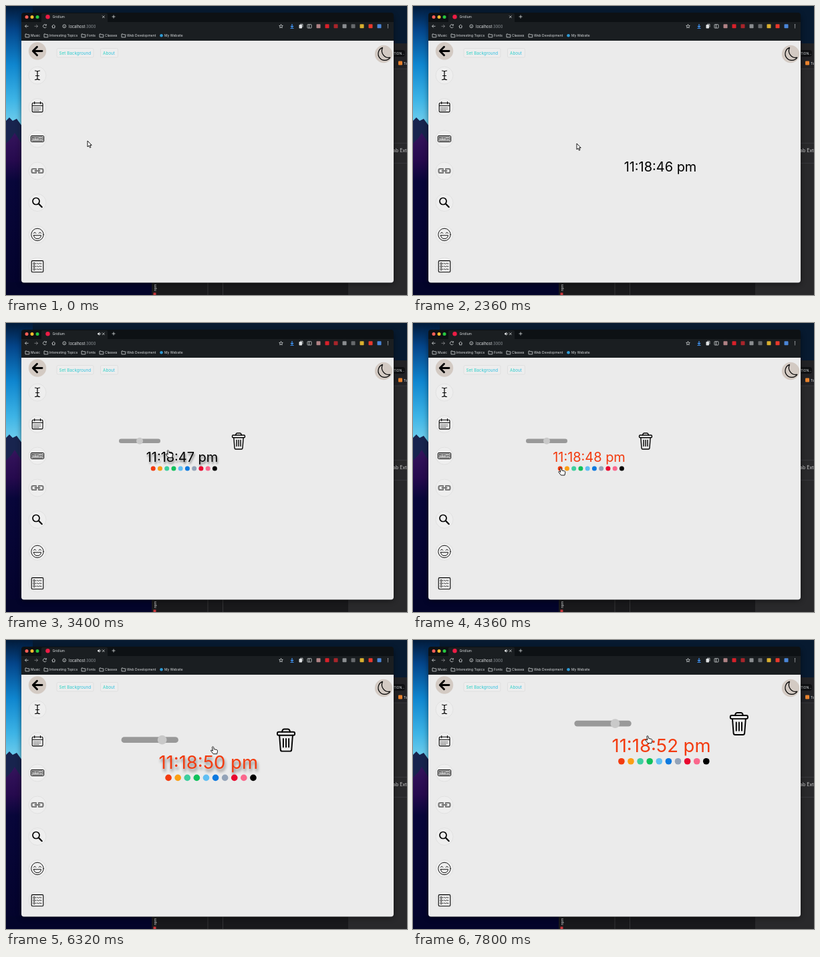
Recreate the animation shown at these times as an HTML page. Size 600 by 433 pixels, loop 7840 ms.

```html
<!DOCTYPE html>
<html lang="en">
<head>
<meta charset="utf-8">
<title>Desktop clock widget</title>
<style>
html, body { margin: 0; width: 100%; height: 100%; overflow: hidden; background: #07102b; }
svg { display: block; width: 100vw; height: 100vh; font-family: Inter, Roboto, sans-serif; }
.line { fill: none; stroke: #000; stroke-linecap: round; stroke-linejoin: round; }
.ui { fill: none; stroke: #d5d8da; stroke-width: .8; }
.label { fill: #dfe2e4; font-size: 5px; }
.pointer { fill: #fff; stroke: #000; stroke-width: .9; stroke-linejoin: round; }
</style>
</head>
<body>
<svg viewBox="0 0 600 433">
  <defs>
    <linearGradient id="sky" gradientUnits="userSpaceOnUse" x1="0" y1="0" x2="0" y2="175">
      <stop offset="0" stop-color="#021b3a"/><stop offset=".2" stop-color="#04458a"/>
      <stop offset=".5" stop-color="#0f86cf"/><stop offset=".8" stop-color="#3db4e6"/>
      <stop offset="1" stop-color="#6fcdec"/>
    </linearGradient>
    <linearGradient id="ridge" gradientUnits="userSpaceOnUse" x1="0" y1="190" x2="0" y2="433">
      <stop offset="0" stop-color="#35145c"/><stop offset=".17" stop-color="#260a4e"/>
      <stop offset=".3" stop-color="#08063a"/><stop offset="1" stop-color="#03032b"/>
    </linearGradient>
    <linearGradient id="aqua"><stop stop-color="#2bd5be"/><stop offset="1" stop-color="#34bde6"/></linearGradient>
    <filter id="soft" x="-10%" y="-10%" width="120%" height="120%"><feGaussianBlur stdDeviation="4"/></filter>
  </defs>

  <!-- Desktop and windows behind -->
  <rect width="600" height="433" fill="#071a30"/>
  <rect width="40" height="433" fill="url(#sky)"/>
  <path d="M0 172 5 167 10 172 16 169 24 180V433H0z" fill="#18244e"/>
  <path d="M0 206 8 198 13 190 24 207V433H0z" fill="url(#ridge)"/>
  <rect y="414" width="220" height="19" fill="#03042a"/>
  <g>
    <rect x="218" y="400" width="382" height="33" fill="#19191b"/>
    <path d="M302 414v19M324.500 414v19" stroke="#353537"/>
    <rect x="512" y="56" width="88" height="377" fill="#29292b"/>
    <rect x="570" y="56" width="30" height="38" fill="#222225"/>
    <rect x="570" y="66" width="27" height="10" rx="4" fill="#0f1012"/>
    <path d="M575 94h25M575 205.500h25M575 235.500h25" stroke="#3c3c3f" stroke-width=".8"/>
    <text x="580" y="73" class="label">TION...</text>
    <rect x="587" y="82.500" width="6" height="6" rx="1" fill="#e8822e"/>
    <text x="595" y="87.500" class="label">To</text>
    <text x="579" y="218.500" fill="#d2d2d2" font-size="7">ab Exte</text>
    <text transform="translate(225 427) rotate(-90)" class="label">npm</text>
    <rect x="220.500" y="429.500" width="4" height="3.500" fill="#c8373c"/>
  </g>
  <rect x="23" y="14" width="557" height="402" rx="5" opacity=".5" filter="url(#soft)"/>

  <!-- Browser -->
  <rect x="23" y="10" width="557" height="404.500" rx="4" fill="#0d1114"/>
  <path d="M53 24V13q0-2 2-2H150q2 0 2 2V24H580V52H23V24z" fill="#1a1e21"/>
  <circle cx="31" cy="16.500" r="2.500" fill="#ff5f57"/>
  <circle cx="39" cy="16.500" r="2.500" fill="#febc2e"/>
  <circle cx="47" cy="16.500" r="2.500" fill="#28c840"/>
  <circle cx="62.500" cy="16.300" r="3.200" fill="#ed1c45"/>
  <text x="69.500" y="18.300" class="label">Gridlum</text>
  <g id="sound"><path d="M137 15.200h1.300l1.700-1.500v5l-1.700-1.500H137z" fill="#dfe2e4"/><path class="ui" d="M141 14.700q1.200 1.500 0 3"/></g>
  <path class="ui" d="m144 14.500 3.500 3.500m0-3.500-3.500 3.500M158.500 16h5m-2.500-2.500v5
    M33.500 30.300h-5m2.300-2.300-2.300 2.300 2.300 2.300
    M60 28.700a2.500 2.500 0 1 0 .3 2.500M60.400 27.300v1.800h-1.800M68.500 30.500l2.700-2.500 2.700 2.500M69.500 30v2.800h3.400V30"/>
  <path class="ui" opacity=".6" d="M42.500 30.300h5m-2.300-2.300 2.300 2.300-2.300 2.300"/>
  <circle class="ui" cx="87.300" cy="30.300" r="2.400"/><path class="ui" d="M87.300 29.800v1.700"/>
  <text x="94" y="32.600" font-size="5.700" fill="#e4e6e8">localhost<tspan fill="#8d9398">:3000</tspan></text>
  <path class="ui" d="m411.500 27.500.8 1.800 2 .2-1.500 1.400.4 2-1.700-1-1.700 1 .4-2-1.500-1.400 2-.2z"/>
  <path d="M428 27v5m-2-2 2 2 2-2M425.500 33.500h5" fill="none" stroke="#3f91ef" stroke-width="1.200"/>
  <rect x="438.500" y="28" width="4.500" height="5.500" rx=".7" fill="#dfe2e4"/><path class="ui" d="M440 27.200h4v4.500"/>
  <rect class="ui" x="451" y="27.700" width="6" height="5.300" rx=".6"/><path class="ui" d="M453.500 28v5"/>
  <g id="extensions"></g>
  <g fill="#d5d8da"><circle cx="571.500" cy="28" r=".7"/><circle cx="571.500" cy="30.300" r=".7"/><circle cx="571.500" cy="32.600" r=".7"/></g>
  <g id="bookmarks"></g>
  <circle cx="232.500" cy="44.300" r="2.300" fill="#2d9bd6"/>
  <text x="237" y="46.200" class="label">My Website</text>

  <!-- Page -->
  <path d="M23 52H580V410.500q0 4-4 4H27q-4 0-4-4z" fill="#ebebeb"/>
  <g fill="#ededed" stroke="#dcdcdc" stroke-width=".8">
    <rect x="76" y="63.500" width="55" height="13.500" rx="2"/><rect x="141.500" y="63.500" width="26" height="13.500" rx="2"/>
  </g>
  <g font-size="6.350" fill="url(#aqua)"><text x="79.500" y="72.700">Set Background</text><text x="145" y="72.700">About</text></g>
  <circle cx="47" cy="67.500" r="13.200" fill="#d3cac3"/>
  <path class="line" d="M54 67.500H40.500m6-6.200-6.200 6.200 6.200 6.200" stroke-width="2.900"/>
  <circle cx="565" cy="72" r="13.200" fill="#d3cac3"/>
  <path class="line" d="M563.400 62.400A9.800 9.800 0 1 0 574.800 77.200 10.500 10.500 0 0 1 563.400 62.400z" stroke-width="1.200"/>
  <g id="rings"></g>
  <circle id="hover" cx="47" cy="199" r="13.500" fill="#d9d9d9" style="filter:drop-shadow(0 3px 3px #0003)"/>
  <path class="line" d="M43.500 97q3 0 3.500 1.500.5-1.500 3.500-1.500M43.500 110.500q3 0 3.500-1.500.5 1.500 3.500 1.500M47 98.500v10.500M44.500 104.500h5" stroke-width="1.200"/>
  <g class="line" stroke-width="1.100"><rect x="39.200" y="145.300" width="15.800" height="13.600" rx="1.500"/>
    <path d="M39.500 149.300h15.300M42.700 143.500v3M51.500 143.500v3"/>
    <path d="M42 152h11M42 154.300h11M42 156.600h8.500" stroke-width="1.200" stroke-dasharray=".1 2.150"/></g>
  <g id="clockIcon"><rect class="line" x="37.300" y="194.500" width="19.400" height="9" rx="1.400" stroke-width="1"/>
    <rect class="line" x="39.100" y="196.300" width="15.800" height="5.400" rx=".5" stroke-width=".7"/>
    <text x="47" y="200.300" font-size="3.200" font-weight="700" text-anchor="middle">12:00 pm</text></g>
  <g class="line" style="stroke:#777" stroke-width="2.200"><path d="M45 245v-1h-4.500q-2 0-2 2v2q0 2 2 2H45v-1M49 245v-1h4.500q2 0 2 2v2q0 2-2 2H49v-1M43.500 247h7"/></g>
  <g class="line" stroke-width="1.700"><circle cx="45" cy="292.500" r="5"/><path d="m48.800 296.300 4.900 4.900" stroke-width="2.200"/></g>
  <g class="line" stroke-width=".9"><circle cx="47" cy="342.500" r="9.200"/>
    <path d="M41.500 340.500q1.500-2.700 3.300 0M49.200 340.500q1.500-2.700 3.300 0M41.500 343.700h11q-.7 5-5.500 5t-5.500-5z"/></g>
  <g class="line" stroke-width=".8"><rect x="38.200" y="381.600" width="17.600" height="17.200" rx="1.800" stroke-width="1.100"/><g id="list"></g></g>

  <!-- Widget, drawn around its own centre -->
  <g id="widget">
    <text id="time" y="7.100" font-size="19.950" text-anchor="middle"></text>
    <g id="controls">
      <rect x="-94.500" y="-27.500" width="62" height="6.400" rx="3.200" fill="#999"/>
      <circle id="thumb" cy="-24.300" r="5" fill="#c9c9c9"/>
      <g class="line" stroke-width="1.400" transform="translate(84.500 -24)">
        <rect x="-9.500" y="-9" width="19" height="3.700" rx="1.500"/>
        <path d="M-4.300-9q.3-3 2.500-3H1.800q2.200 0 2.500 3M-7.200-5.300-6 10.300q.2 1.700 1.800 1.700H4.200Q5.800 12 6 10.300L7.200-5.300M-3-1.500V7.500M0-1.500V7.500M3-1.500V7.500"/>
      </g>
      <g id="dots"></g>
    </g>
  </g>
  <g id="cursor">
    <path id="arrow" class="pointer" d="M0 0V9l2-1.800 1.500 3.100 1.500-.7-1.500-3.100h2.700z"/>
    <path id="hand" class="pointer" d="M-1.200.8q1.200-1.600 2.200.2l.6 3 4 .9q1.600.5 1.200 2.200l-.8 4H.5l-3.600-4.600q-.2-1.600 1.600-.8l1.300.9z"/>
  </g>
</svg>
<script>
const LOOP = 7840, ADDED = 1440, HOVERED = 2640, RECOLOUR = 4200;
const $ = id => document.getElementById(id);
const fill = (id, items, draw) => { $(id).innerHTML = items.map(draw).join(''); };

const palette = ['#f33b0f', '#fb9f14', '#3dcf9e', '#10c15c', '#61bff3',
  '#0c79df', '#93a3b8', '#e9082f', '#fa678c', '#000'];

fill('dots', palette, (c, i) => `<circle cx="${-43.3 + i * 10.24}" cy="16.9" r="3.5" fill="${c}"/>`);
fill('rings', [104, 151.5, 199, 247, 294.5, 342.5, 390],
  y => `<circle cx="47" cy="${y}" r="13" fill="#eee" stroke="#dedede" stroke-width=".8"/>`);
fill('list', [386, 390.2, 394.4],
  y => `<circle cx="42.200" cy="${y}" r="1.400"/><path d="M45.500 ${y}q1-.9 2 0t2 0 1.500 0h2"/>`);
fill('bookmarks', [[29, 'Music'], [57, 'Interesting Topics'], [113, 'Fonts'], [140, 'Classes'], [173, 'Web Development']],
  ([x, name]) => `<path class="ui" d="M${x} 42h2l.8.9h3v3.900h-5.800z"/><text class="label" x="${x + 8}" y="46.2">${name}</text>`);
fill('extensions', ['#b08285', '#d8202a', '#a8252b', '#8a8d90', '#66696c', '#d9b02f', '#e8382c', '#4a86d8'],
  (c, i) => `<rect x="${464.500 + i * 13}" y="27.300" width="6" height="6" rx=".8" fill="${c}"/>`);

// Keys are [time, ...values]; values ease between neighbouring keys.
const cursorPath = [
  [300, 122, 202], [1050, 46.5, 200], [1560, 46.5, 200], [2320, 245, 206], [2400, 245, 206],
  [2680, 349, 230.5], [2800, 349, 230.5], [3360, 242.5, 190.5], [3600, 242.5, 190.5],
  [4100, 221, 217], [4350, 221, 217], [4900, 200, 175], [5400, 200, 175], [5720, 214, 175],
  [5800, 214, 175], [6040, 269.5, 174.5], [6723, 378.5, 134], [7000, 378.5, 134], [7500, 351, 143.5]
];
const widgetPath = [
  [2800, 370, 241], [3360, 263.5, 201], [5400, 263.5, 201],
  [5720, 262.5, 197.5], [6040, 262.5, 197.5], [6723, 371.5, 158.5]
];
const sizePath = [[5400, 1, .5], [5720, 1.377, .757]];

function at(keys, t) {
  const next = keys.findIndex(k => k[0] > t);
  if (next === 0) return keys[0].slice(1);
  if (next < 0) return keys[keys.length - 1].slice(1);
  const [a, b] = [keys[next - 1], keys[next]];
  const u = (t - a[0]) / (b[0] - a[0]), e = u * u * (3 - 2 * u);
  return a.slice(1).map((v, i) => v + (b[i + 1] - v) * e);
}
const show = (id, on) => { $(id).style.display = on ? '' : 'none'; };
const place = (id, x, y, s = 1) => $(id).setAttribute('transform', `translate(${x} ${y}) scale(${s})`);

function draw(t) {
  const [cx, cy] = at(cursorPath, t), [wx, wy] = at(widgetPath, t), [scale, level] = at(sizePath, t);
  const over = Math.hypot(cx - 47, cy - 199) < 13;
  const dragging = t >= 2740 && t < 3500 || t >= 6040 && t < 6950;
  const grow = over ? 1.1 : 1;

  place('cursor', cx, cy);
  show('arrow', t < HOVERED);
  show('hand', t >= HOVERED);
  show('sound', t >= 2800);
  show('hover', over);
  place('clockIcon', 47 * (1 - grow), 199 * (1 - grow), grow);

  show('widget', t >= ADDED);
  show('controls', t >= HOVERED);
  place('widget', wx, wy, scale);
  $('thumb').setAttribute('cx', -89.5 + 52 * level);
  const time = $('time');
  time.textContent = `11:18:${46 + Math.floor((t - ADDED) / 1000)} pm`;
  time.style.fill = t < RECOLOUR ? '#000' : palette[0];
  time.style.filter = dragging ? 'drop-shadow(1px 3px 1.5px #0007)' : 'none';
}

const start = performance.now();
function tick() {
  draw((performance.now() - start) % LOOP);
  requestAnimationFrame(tick);
}
tick();
</script>
</body>
</html>
```
